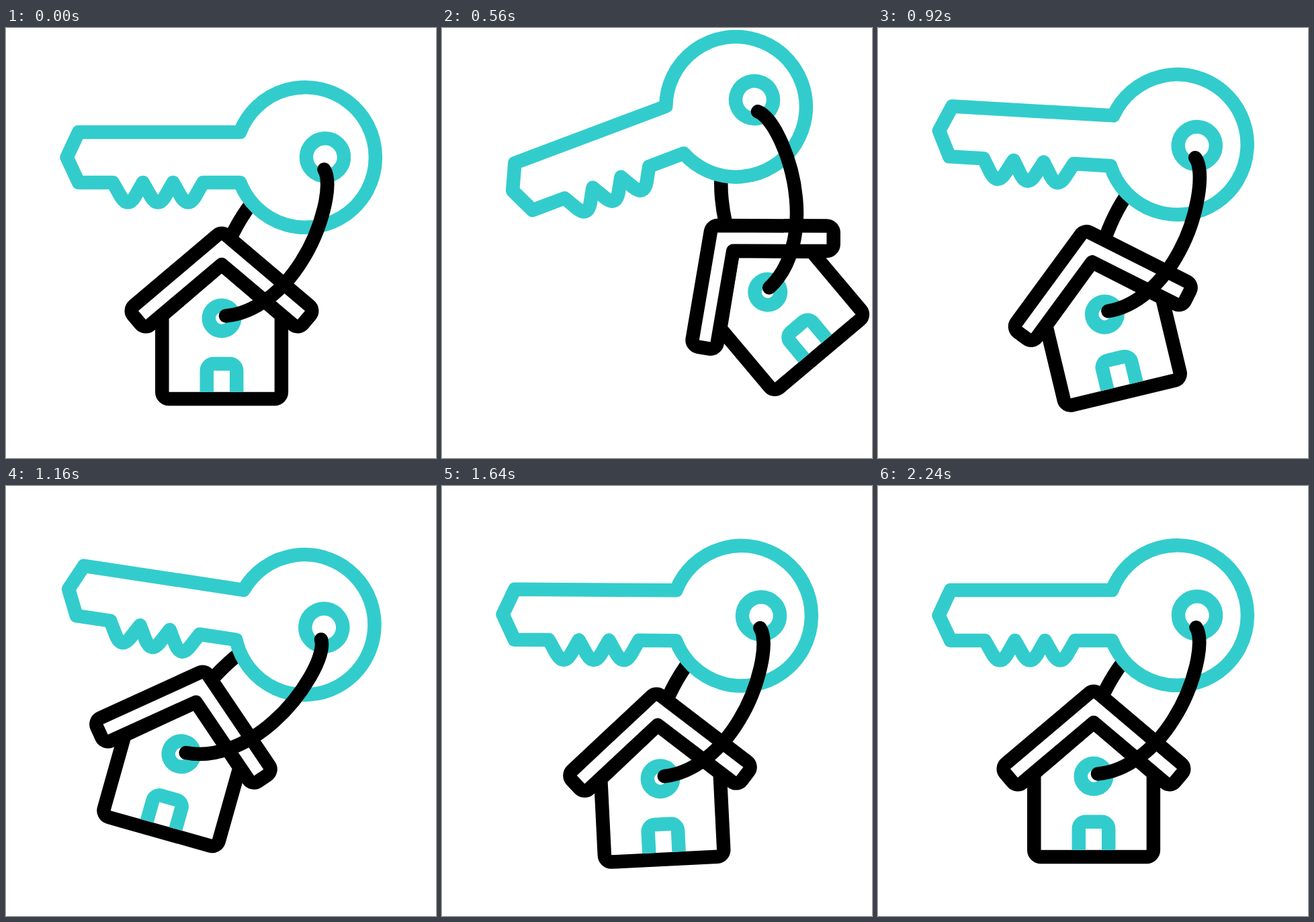
These frames come from a looping animation (640 px wide and 640 px high, 2.64 s). An HTML page:

```html
<!DOCTYPE html>
<html lang="en">
<head>
<meta charset="utf-8">
<title>House key</title>
<style>
html, body { margin: 0; height: 100%; overflow: hidden; background: #fff; }
svg { display: block; width: 100%; height: 100%; }
g { fill: #fff; stroke: #000; stroke-width: 20.5; stroke-linejoin: round; }
.teal { stroke: #33cccc; }
.line { fill: none; }
</style>
</head>
<body>
<svg viewBox="0 0 640 640">
  <g class="strap line"><path d="M318 352Q340 290 372 253"/></g>
  <g class="key teal">
    <path d="M348.3 155H108L90.5 192.5L108 230H159
      l11.9 21q10.5 17 21 0l11.9-21
      l11.9 21q10.5 17 21 0l11.9-21
      l11.9 21q10.5 17 21 0l11.9-21
      H348.3A104.3 104.3 0 1 0 348.3 155Z"/>
    <circle cx="475" cy="192.3" r="28"/>
  </g>
  <g class="house">
    <path d="M232.3 428V541.7A10.2 10.2 0 0 0 242.5 552H399.7A10.2 10.2 0 0 0 409.9 541.7V428L321 352Z"/>
    <path d="M327.6 308.2L451.6 413.2A10.2 10.2 0 0 1 452.8 427.6L441.8 440.6A10.2 10.2 0 0 1 427.4 441.8
      L321 352L214.6 441.8A10.2 10.2 0 0 1 200.2 440.6L189.2 427.6A10.2 10.2 0 0 1 190.4 413.2
      L314.4 308.2A10.2 10.2 0 0 1 327.6 308.2Z"/>
    <circle class="teal" cx="321" cy="432" r="19.2"/>
    <path class="teal line" d="M298.8 541.8V510A10.2 10.2 0 0 1 309 499.8H333A10.2 10.2 0 0 1 343.2 510V541.8"/>
  </g>
  <g class="strap line" stroke-linecap="round">
    <path d="M473.5 210.5C487 232 470 300 440 347C412 392 370 425 327 428.5"/>
  </g>
</svg>
<script>
const LOOP = 2640, STEP = 40;

// Each track is a list of [time, value], eased in and out between keys.
const lift = [[80, 0], [720, -36.7], [1290, 0]];
const keyTurn = [[40, 0], [500, -21.5], [1080, 9], [1711, 0]];
const strapTurn = [[240, 0], [720, -23], [1120, 7.8], [1540, -1.5], [2040, 0]];
const houseTurn = [[400, 0], [880, -9.5], [1360, 5], [1780, -4.2], [2060, 0.5], [2240, 0]];

function sample(track, t) {
  const i = track.findIndex(([time]) => time > t);
  if (i < 0) return track[track.length - 1][1];
  if (i === 0) return track[0][1];
  const [t0, a] = track[i - 1], [t1, b] = track[i];
  const x = (t - t0) / (t1 - t0);
  return a + (b - a) * x * x * (3 - 2 * x);
}

function place(name, transform) {
  for (const el of document.querySelectorAll("." + name)) el.setAttribute("transform", transform);
}

function draw(now) {
  const t = Math.floor(now % LOOP / STEP) * STEP;
  // The strap hangs from the key, the house hangs from the strap.
  const key = `translate(0 ${sample(lift, t)}) rotate(${sample(keyTurn, t)} 320 192.5)`;
  const strap = `${key} rotate(${sample(strapTurn, t)} 473.5 210.5)`;
  place("key", key);
  place("strap", strap);
  place("house", `${strap} rotate(${sample(houseTurn, t)} 327 428.5)`);
}

const start = performance.now();
function loop() {
  draw(performance.now() - start);
  requestAnimationFrame(loop);
}
loop();
</script>
</body>
</html>
```
